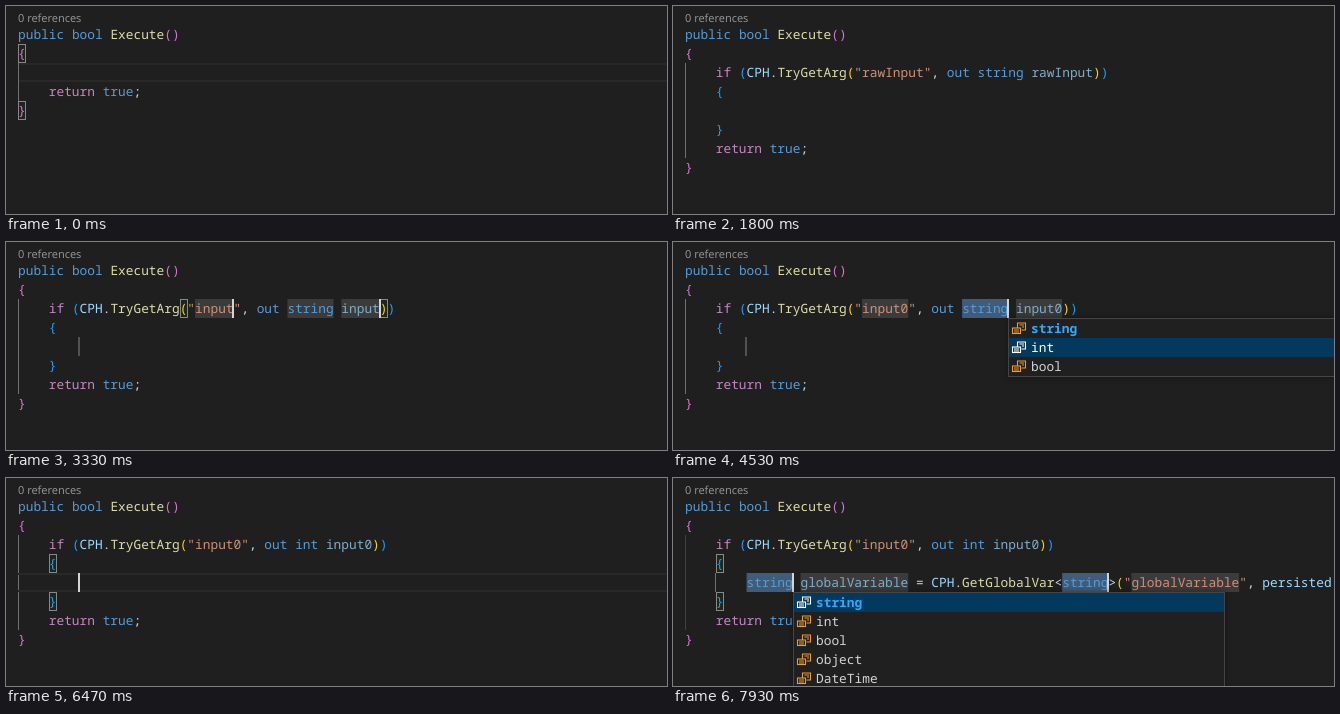
An HTML page that plays this animation: 661 by 208 pixels, repeating every 8 s.

```html
<!DOCTYPE html>
<html lang="en">
<head>
<meta charset="utf-8">
<title>Code snippets in an editor</title>
<style>
html, body { margin: 0; width: 100%; height: 100%; overflow: hidden; background: #1f1f1f; }
svg { display: block; width: 661px; height: 208px; background: #1f1f1f; }
text {
  font: 12.83px "Noto Sans Mono", "DejaVu Sans Mono", monospace;
  white-space: pre;
  text-rendering: geometricPrecision;
}
.lens { font: 11px "Open Sans", "Noto Sans", sans-serif; fill: #999; }
.detail { font-size: 10.9px; fill: #989898; text-anchor: end; }
.match { font-weight: bold; fill: #2aaaff; }
.popup { filter: drop-shadow(0 0 3px rgba(0, 0, 0, .4)); }
.icon { fill: none; stroke-width: 1.1; }
</style>
</head>
<body>
<svg id="stage" viewBox="0 0 661 208"></svg>
<script>
const LOOP = 8000, LEFT = 12, CHAR = 7.697, ROW = 19;
const stage = document.getElementById('stage');

const COLORS = {
  k: '#569cd6', c: '#c586c0', f: '#dcdcaa', v: '#9cdcfe', u: '#7faec8', s: '#ce9178',
  w: '#d4d4d4', p: '#da70d6', b: '#179fff', g: '#ffd700'
};

const colX = col => LEFT + col * CHAR;
const esc = s => s.replace(/&/g, '&amp;').replace(/</g, '&lt;');
const rect = (x, y, w, h, fill) => `<rect x="${x}" y="${y}" width="${w}" height="${h}" fill="${fill}"/>`;
const at = (t, list) => list.filter(([start]) => start <= t).pop()[1];
const within = (t, ...spans) => spans.some(([a, b]) => t >= a && t < b);

// Each part is a colour key followed by its text; parts are joined by "|".
function code(row, col, spec) {
  const parts = spec.split('|').map(p => `<tspan fill="${COLORS[p[0]]}">${esc(p.slice(1))}</tspan>`);
  return `<text x="${colX(col)}" y="${row * ROW + 14}">${parts.join('')}</text>`;
}

const caret = (row, col) => rect(Math.round(colX(col) - 1.2), row * ROW, 2, ROW, '#d4d4d4');
const mark = (row, col, len, fill) => rect(colX(col), row * ROW, len * CHAR, ROW, fill);
const select = (row, col, len) => mark(row, col, len, '#264f78');
const tabstop = (row, col, len) => mark(row, col, len, 'rgba(124,124,124,.3)');
const guide = (col, from, to, color) => rect(Math.floor(colX(col)), from * ROW, 1, (to - from) * ROW, color);

const bracket = (row, col) =>
  `<rect x="${Math.round(colX(col)) + .5}" y="${row * ROW + .5}" width="7" height="18" fill="rgba(0,100,0,.1)" stroke="#888"/>`;

const currentLine = row =>
  rect(LEFT, row * ROW, 649, 2, '#282828') + rect(LEFT, row * ROW + 17, 649, 2, '#282828');

function squiggle(x, y, width) {
  let d = `M${x} ${y + 2.5}`;
  for (let i = 2; i <= width; i += 2) d += `L${x + i} ${y + (i % 4 ? .5 : 2.5)}`;
  return `<path d="${d}" fill="none" stroke="#f14c4c"/>`;
}

const ICONS = {
  keyword: ['#d4d4d4', '<path d="M-7-4.5H1M3-4.5H7M-7-1.5H-4M-2-1.5H7M-7 1.5H0M-7 4.5H-3M-1 4.5H6"/><rect x="2" y=".5" width="4" height="2"/>'],
  snippet: ['#d4d4d4', '<path d="M-5.5 4V-5.5H5.5V4"/><path d="M-6 5.5H6" stroke-dasharray="2 1.3"/>'],
  type: ['#75beff', '<circle cx="-5" r="1.7"/><path d="M-3.3 0H1.2"/><circle cx="4" r="2.7"/>'],
  choice: ['#ee9d28', '<path d="M-1.5-.5V-5.5H6.5V1.5H2.5M.5-3.5H5M3-1.5H5"/><rect x="-6.5" y="-.5" width="8" height="5.5"/><path d="M-5 1.5H0M-5 3.5H0"/>']
};

function popup(row, col, items, focus, typed) {
  const x = Math.round(colX(col)), y = row * ROW, h = items.length * ROW + 2;
  const lines = items.map(([icon, label, detail = ''], i) => {
    const top = y + 1 + i * ROW, on = i === focus;
    const n = label.toLowerCase().startsWith(typed) ? typed.length : 0;
    const [color, shape] = ICONS[icon];
    return (on ? rect(x + 1, top, 430, ROW, '#04395e') : '') +
      `<g class="icon" transform="translate(${x + 11} ${top + 9.5})" stroke="${on ? '#fff' : color}">${shape}</g>` +
      `<text x="${x + 23}" y="${top + 14}" fill="${on ? '#fff' : '#d4d4d4'}">` +
      `<tspan class="match">${label.slice(0, n)}</tspan>${label.slice(n)}</text>` +
      `<text class="detail" x="${x + 422}" y="${top + 13}">${detail}</text>`;
  });
  return `<g class="popup"><rect x="${x + .5}" y="${y + .5}" width="431" height="${h - 1}" fill="#202020" stroke="#454545"/></g>` +
    lines.join('');
}

const IF_ITEMS = [
  ['keyword', 'if'],
  ['snippet', 'if', 'if statement'],
  ['snippet', 'if-get-argument', 'Try Get Argument inside If Statement'],
  ['snippet', 'ifd', '#if'],
  ['type', 'IFormatProvider'],
  ['type', 'IFormattable'],
  ['type', 'IFieldInfo', 'System.Runtime.Serialization.Formatters']
];
const GET_ITEMS = [
  ['snippet', 'get-argument', 'Try Get Argument'],
  ['snippet', 'get-global-variable', 'Get Global Variable'],
  ['type', 'GetType'],
  ['type', 'GetHashCode'],
  ['keyword', 'get']
];
const TYPE_ITEMS = ['string', 'int', 'bool', 'object', 'DateTime'].map(s => ['choice', s]);

// The empty method, and the first word typed into it.
function emptyMethod(t) {
  const word = at(t, [[0, ''], [870, 'i'], [1000, 'if'], [1330, 'if-']]);
  const end = 4 + word.length;
  let out = currentLine(3) + guide(0, 3, 5, '#707070') + bracket(2, 0) + bracket(5, 0);
  out += code(2, 0, 'p{') + code(4, 4, 'creturn |ktrue|w;') + code(5, 0, 'p}');
  if (word) out += code(3, 4, (within(t, [1200, 1330], [1470, 1800]) ? 'c' : 'w') + word.slice(0, 2) + '|w' + word.slice(2));
  if (within(t, [1000, 1330])) out += squiggle(104, 35, 54);
  if (within(t, [1200, 1330])) out += squiggle(58, 73, 6);
  if (t >= 1470) out += squiggle(43, 73, 22);
  if (t >= 330) out += caret(3, end);
  if (t >= 930) out += popup(4, end, t < 1330 ? IF_ITEMS : [IF_ITEMS[2]], 0, word);
  return out;
}

// The condition with its linked fields.
function condition(t) {
  const name = at(t, [[0, 'rawInput'], [2530, 'i'], [2730, 'in'], [3070, 'inp'], [3200, 'inpu'], [3330, 'input'], [3730, 'input0']]);
  const type = t < 5000 ? 'string' : 'int';
  const n = name.length, typeCol = 30 + n, varCol = typeCol + type.length + 1;
  const varColor = within(t, [2730, 2930]) ? 'v' : 'u';
  let out = '';
  if (within(t, [1870, 2530])) out += select(3, 23, n) + select(3, varCol, n);
  if (within(t, [4130, 5000])) out += select(3, typeCol, 6);
  if (within(t, [1870, 5470])) {
    out += tabstop(3, 23, n) + tabstop(3, typeCol, type.length) + tabstop(3, varCol, n);
    out += rect(72, 5 * ROW, 2, ROW, '#525252');
  }
  if (within(t, [2530, 4130])) out += bracket(3, 21) + bracket(3, varCol + n);
  out += code(3, 4, `cif |b(|vCPH|w.|fTryGetArg|g(|s"${name}"|w, |kout ${type} |${varColor}${name}|g)|b)`);
  if (within(t, [1870, 2400], [2530, 4130])) out += caret(3, 23 + n) + caret(3, varCol + n);
  if (within(t, [4130, 4670], [5000, 5470])) out += caret(3, typeCol + type.length);
  return out;
}

// The body of the condition, with the second snippet.
function body(t) {
  const word = at(t, [[0, ''], [6930, 'g'], [7070, 'ge'], [7200, 'get']]);
  const end = 8 + word.length;
  let out = guide(0, 3, 8, t < 6930 ? '#707070' : '#404040');
  if (t >= 6930) out += guide(4, 5, 6, '#707070');
  if (t >= 5530) out += bracket(4, 4) + bracket(6, 4);
  if (within(t, [5530, 7930])) out += currentLine(5);
  out += code(2, 0, 'p{') + code(4, 4, 'b{') + code(6, 4, 'b}') + code(7, 4, 'creturn |ktrue|w;') + code(8, 0, 'p}');
  if (t >= 7930) {
    for (const col of [8, 49]) out += select(5, col, 6) + tabstop(5, col, 6);
    out += tabstop(5, 15, 14) + tabstop(5, 58, 14);
    out += code(5, 8, 'kstring |uglobalVariable|w = |vCPH|w.|fGetGlobalVar|w<|kstring|w>|g(|s"globalVariable"|w, |vpersisted');
    return out + caret(5, 14) + caret(5, 55) + popup(6, 14, TYPE_ITEMS, 0, 'string');
  }
  if (word) out += code(5, 8, 'w' + word);
  if (within(t, [5530, 6000], [6470, 7670])) out += caret(5, end);
  if (t >= 7000) out += popup(6, end, t < 7200 ? GET_ITEMS : GET_ITEMS.slice(0, 2), t < 7600 ? 0 : 1, word);
  return out;
}

function scene(t) {
  let out = '<text class="lens" x="12" y="16">0 references</text>' + code(1, 0, 'kpublic bool |fExecute|p()');
  if (t < 1800) return out + emptyMethod(t);
  out += condition(t) + body(t);
  if (within(t, [4200, 5000])) out += popup(4, 42, TYPE_ITEMS.slice(0, 3), t < 4530 ? 0 : 1, 'string');
  return out;
}

let shown = '';
function draw() {
  const next = scene(performance.now() % LOOP);
  if (next !== shown) stage.innerHTML = shown = next;
  requestAnimationFrame(draw);
}
draw();
</script>
</body>
</html>
```
